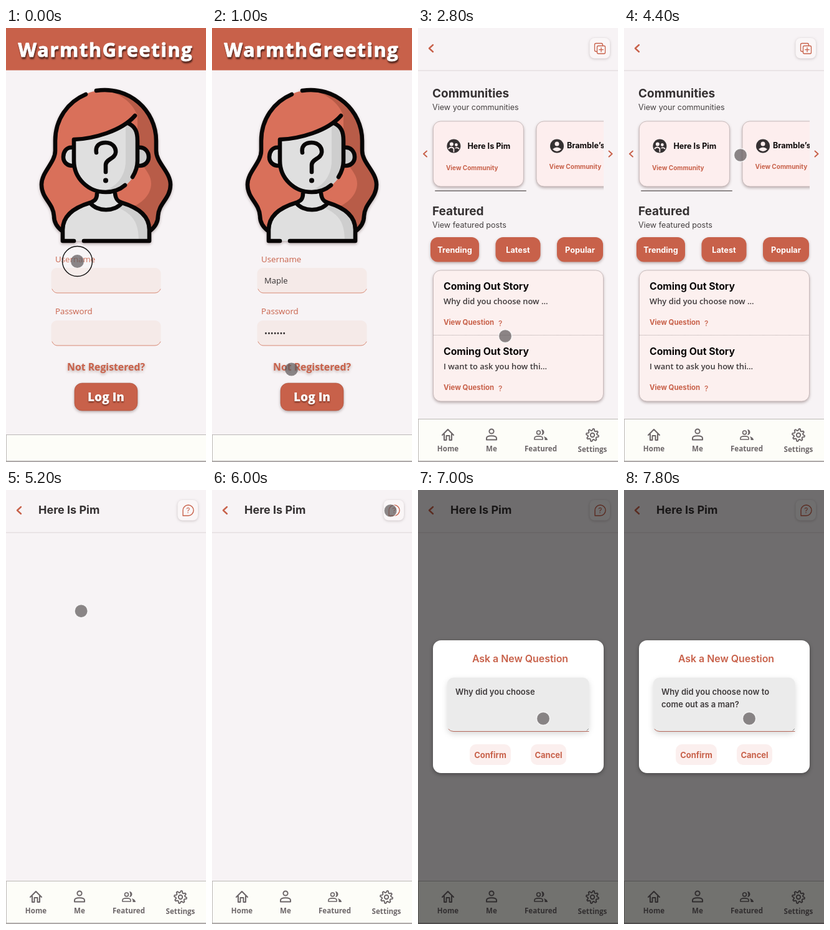
An HTML page that plays this animation: 321 by 693 pixels, repeating every 8 s.

```html
<!DOCTYPE html>
<html lang="en">
<head>
<meta charset="utf-8">
<title>Community app walkthrough</title>
<style>
  html, body { margin: 0; width: 100%; height: 100%; overflow: hidden; background: #f7f3f5; }
  svg { display: block; width: 321px; height: 693px; }
  text { font-family: Inter, sans-serif; font-weight: 700; white-space: pre; }
  .soft { font-family: "Open Sans", sans-serif; }
  .raised { filter: drop-shadow(0 2px 2px rgba(70, 40, 40, .35)); }
  .line { fill: none; stroke-linecap: round; stroke-linejoin: round; }
</style>
</head>
<body>
<svg id="stage" viewBox="0 0 321 693"></svg>
<script>
const RED = '#c8614a', BG = '#f7f3f5', INK = '#353132', GREY = '#6d6769';
const LOOP = 8000, STEP = 200;
const GROUP = 'Here Is Pim';
const QUESTION = ['Why did you choose now to ', 'come out as a man?'];

const text = (x, y, size, str, fill = INK, extra = '') =>
  `<text x="${x}" y="${y}" font-size="${size}" fill="${fill}" ${extra}>${str}</text>`;
const soft = (x, y, size, str, fill, weight, extra = '') =>
  text(x, y, size, str, fill, `class="soft" style="font-weight:${weight}" ${extra}`);
const box = (x, y, w, h, r, fill, extra = '') =>
  `<rect x="${x}" y="${y}" width="${w}" height="${h}" rx="${r}" fill="${fill}" ${extra}/>`;
const line = (d, color, width, extra = '') =>
  `<path class="line" d="${d}" stroke="${color}" stroke-width="${width}" ${extra}/>`;
const disc = (x, y, r, fill, extra = '') =>
  `<circle cx="${x}" cy="${y}" r="${r}" fill="${fill}" ${extra}/>`;
const area = (d, fill) => `<path d="${d}" fill="${fill}"/>`;
const group = (body, attrs = '') => `<g ${attrs}>${body}</g>`;
const centered = 'text-anchor="middle"';

function portrait() {
  const rightSide = 'M160 99C205 99 241 135 241 180V196C241 215 264 230 264 250C264 272 245 280 244 300' +
    'C244 312 238 322 228 326';
  const hair = rightSide + 'H92C82 322 77 312 77 300C76 280 57 272 57 250C57 230 79 215 79 196V180C79 135 115 99 160 99Z';
  const shade = rightSide + 'L190 290C215 284 233 268 233 248C233 228 211 220 211 190V140C203 118 182 104 158 99Z';
  const face = 'M109 178C140 177 180 165 198 152C207 157 211 165 211 180V212C211 240 188 262 160 262C132 262 109 240 109 212Z';
  const body = 'M91 340V322C91 300 108 288 135 279L146 272V255H175V268L186 279C215 288 230 300 230 322V340Z';
  const outlines = [
    'M128 106C99 118 79 146 79 180V196C79 215 57 230 57 250C57 272 76 280 77 300C77 310 82 318 90 324',
    'M145 100C198 92 241 132 241 180V196C241 215 264 230 264 250C264 272 245 280 244 300C244 310 239 318 231 324',
    'M207 140C185 165 140 177 109 178V212C109 240 132 262 160 262C173 262 184 257 191 251',
    'M196 152C207 157 211 165 211 180V212C211 222 208 230 203 238',
    'M108 191C96 189 92 199 92 206C92 214 98 220 107 220',
    'M212 191C223 189 229 198 229 206C229 214 223 220 214 220',
    'M146 264C146 274 142 276 135 279C108 287 91 300 91 322V340H109',
    'M175 264C176 273 179 277 186 279C213 287 230 300 230 322V340H125',
    'M135 279C146 294 175 294 186 279',
    'M145 199C143 187 151 183 160 183C171 183 177 191 176 199C175 209 160 209 160 219V230'
  ];
  return group(
    area(hair, '#d9705a') + area(shade, '#b85c48') +
    disc(105, 206, 14, '#dfdfdf') + disc(215, 206, 14, '#cecece') +
    area(body, '#dfdfdf') +
    area('M186 280C215 288 230 300 230 322V340H213C213 312 205 298 180 287Z', '#cecece') +
    area(face, '#dfdfdf') +
    area('M198 152C207 157 211 165 211 180V212C211 240 188 262 160 262L153 261C178 255 192 236 192 212V157Z', '#cecece') +
    line(outlines.join(''), '#080606', 6.6) + disc(160, 243.5, 4, '#080606'), 'class="raised"');
}

const field = (y, value) =>
  box(72.5, y, 176, 40, 9, '#f5eae8') +
  line(`M74 ${y + 34}Q77 ${y + 40} 82 ${y + 40}H239Q245 ${y + 40} 248 ${y + 34}`, '#d88873', 1) +
  soft(84, y + 25, 13, value, INK, 400);

function login(t) {
  const name = 'Maple'.slice(0, Math.max(0, t / 80));
  const dots = '•'.repeat(Math.min(7, Math.max(0, (t - 500) / 60)));
  return box(0, 0, 321, 67.5, 0, RED) +
    soft(160, 46, 30.5, 'WarmthGreeting', '#fff', 700, `${centered} letter-spacing="1.8" stroke="#fff" stroke-width="1"
      stroke-linejoin="round" filter="drop-shadow(1px 3px 1px rgba(50,20,15,.8))"`) +
    portrait() +
    soft(79, 374, 13.3, 'Username', RED, 500) + field(383, name) +
    soft(79, 457, 13.3, 'Password', RED, 500) + field(467, dots) +
    soft(160.5, 547, 15.8, 'Not Registered?', RED, 700, `${centered} filter="drop-shadow(0 2px 2px rgba(90,40,30,.4))"`) +
    box(110, 567, 101, 44, 12, RED, 'class="raised" stroke="#a9503c" stroke-width=".6"') +
    soft(160.5, 596, 19, 'Log In', '#fff', 800, `${centered} filter="drop-shadow(0 2px 1px rgba(70,20,10,.6))"`) +
    bottomBar(649.5);
}

const bottomBar = y =>
  box(.5, y, 322, 692 - y, 0, '#fdfdf8', 'stroke="#bcb8b7"') + box(0, 691.3, 321, 1.2, 0, '#8f8b8a');

function gear(cx, cy) {
  const points = [];
  for (let i = 0; i < 32; i++) {
    const a = (i + .5) * Math.PI / 16, r = i % 4 < 2 ? 10 : 7.3;
    points.push(`${(cx + r * Math.sin(a)).toFixed(1)} ${(cy - r * Math.cos(a)).toFixed(1)}`);
  }
  return line(`M${points.join('L')}Z`, GREY, 1.9) + disc(cx, cy, 3.2, 'none', `stroke="${GREY}" stroke-width="1.9"`);
}

const person = (x, y) =>
  line(`M${x - 8} ${y + 8.5}V${y + 6}C${x - 8} ${y + 1} ${x + 8} ${y + 1} ${x + 8} ${y + 6}V${y + 8.5}Z`, GREY, 2) +
  disc(x, y - 5, 3.6, 'none', `stroke="${GREY}" stroke-width="2"`);

function navBar() {
  const label = (x, str, y = 675.5) => soft(x, y, 11.6, str, GREY, 700, centered);
  return bottomBar(624.5) +
    line('M39 650L48 641L57 650M42 648V658H45.5V651H50.5V658H54V648', GREY, 2) +
    person(118, 649) +
    group(person(0, 0), 'transform="translate(193.5 650) scale(.82)"') +
    area('M198 641A4 4 0 1 1 198 650Q201 646 198 641ZM202 652Q208 654 208 658H203.5Q204 655 202 652Z', GREY) +
    gear(280, 650) +
    label(48, 'Home') + label(118, 'Me') + label(197, 'Featured') + label(280, 'Settings', 676.5);
}

function header(icon, title = '') {
  return box(0, 67, 321, 2, 0, '#e9e4e6') +
    line('M24 27L18 32.5L24 38', RED, 2.4) +
    text(52, 38, 18, title) +
    box(275.5, 16, 32.5, 32.5, 8, '#faf6f7', 'filter="drop-shadow(0 1px 2px rgba(70,50,50,.25))"') + icon;
}

const addIcon = box(287.5, 28.5, 13, 12.5, 2, 'none', `stroke="${RED}" stroke-width="1.3"`) +
  line('M287 37.5H286Q283.5 37.5 283.5 35.5V26.5Q283.5 24.500 286 24.500H294.5Q296.500 24.500 296.500 28M294 31.500V38M290.700 34.700H297.300', RED, 1.3);
const askIcon = line('M284 41V32.5A8.5 8.5 0 1 1 292.5 41Z', RED, 1.4) +
  text(292.2, 37, 12, '?', RED, `${centered} style="font-weight:400"`);

const cardStyle = 'class="raised" stroke="#bfb2b2" stroke-width=".8"';

function communityCard(x, name, many) {
  const cx = x + 33, cy = 188.5, pale = '#fdeeee';
  const glyph = many
    ? disc(cx - 3.5, cy - 3, 3, pale) + disc(cx + 4, cy - 2, 2.4, pale) +
      line(`M${cx - 8} ${cy + 4}Q${cx - 4} ${cy} ${cx} ${cy + 4}V${cy + 9}M${cx + 3} ${cy + 3}Q${cx + 6} ${cy + 2} ${cx + 8} ${cy + 4}`, pale, 1.8)
    : disc(cx, cy - 3.5, 3.5, pale) +
      area(`M${cx - 7} ${cy + 5}Q${cx} ${cy - 1} ${cx + 7} ${cy + 5}Q${cx} ${cy + 12} ${cx - 7} ${cy + 5}Z`, pale);
  return box(x, 149, 145, 104, 12, pale, cardStyle) +
    disc(cx, cy, 11, INK) + glyph +
    text(many ? x + 55 : x + 49, many ? 193 : 192, 12.6, name, '#0c0909') +
    text(x + 20.5, many ? 227 : 225, 10, 'View Community', RED);
}

const pill = (x, w, label) =>
  box(x, 334, w, 39.5, 12, RED, 'class="raised"') + text(x + w / 2, 358.5, 12.7, label, '#fff', centered);

const post = (y, summary) =>
  text(41, y, 15.8, 'Coming Out Story', '#0c0909') +
  soft(41, y + 23, 12.9, summary, '#3f3a3b', 600) +
  text(41, y + 56, 11.4, 'View Question', RED) +
  text(129, y + 58, 12, '?', RED, 'style="font-weight:500"');

const home = header(addIcon) +
  text(23, 111, 19, 'Communities') +
  text(23, 131, 12.6, 'View your communities', '#454041', 'style="font-weight:400"') +
  '<clipPath id="strip"><rect x="15" y="140" width="283" height="125"/></clipPath>' +
  group(communityCard(24.4, GROUP, true) + communityCard(190, 'Bramble\u2019s', false), 'clip-path="url(#strip)"') +
  line('M14 196.5L9 201L14 205.5M306.5 196.5L311.5 201L306.5 205.5', RED, 1.9) +
  line('M28 260H173', '#8f898a', 2) +
  text(23, 298.5, 19, 'Featured') +
  text(23, 319, 12.6, 'View featured posts', '#454041', 'style="font-weight:400"') +
  pill(20, 78, 'Trending') + pill(124.5, 72, 'Latest') + pill(223, 74, 'Popular') +
  box(24.5, 387, 273, 209, 12, '#fcf0ef', cardStyle) +
  line('M25 490.5H297', '#a39999', 1, 'stroke-dasharray=".1 2"') +
  post(418, 'Why did you choose now ...') + post(522, 'I want to ask you how thi...') +
  navBar();

const community = header(askIcon, GROUP) + navBar();

function dialog(t) {
  const typed = Math.round(Math.max(0, t - 6600) / 1000 * QUESTION.join('').length);
  const first = QUESTION[0].slice(0, typed);
  const second = QUESTION[1].slice(0, Math.max(0, typed - QUESTION[0].length));
  const entry = (y, str) => text(60, y, 13, str, '#3f3b3c', 'style="font-weight:600"');
  const action = (x, w, label) =>
    box(x, 406, w, 33, 10, '#fbefee') + text(x + w / 2, 427.5, 13, label, RED, centered);
  return box(0, 0, 321, 693, 0, '#000', 'opacity=".55"') +
    (t < 6400 ? box(275, 16, 34, 33, 0, '#63a8ba') : '') +
    box(24, 240, 274, 212, 13, '#fff', 'filter="drop-shadow(0 2px 3px rgba(0,0,0,.35))"') +
    text(164, 274.5, 15.9, 'Ask a New Question', RED, `${centered} style="font-weight:600"`) +
    box(47, 299.5, 227.5, 86, 10, '#ebebeb', 'filter="drop-shadow(0 4px 5px rgba(0,0,0,.15))"') +
    line('M49 382Q52 385.5 57 385.5H274', '#b5685a', 1) +
    line('M271 384L273.5 381.5', '#555', .7) +
    (typed ? entry(327, first) + entry(347, second) : entry(327, 'Write a question...')) +
    action(83, 66, 'Confirm') + action(181, 57, 'Cancel');
}

// Pointer stops: time, x, y
const STOPS = [
  [0, 114.5, 372.5], [400, 119, 403], [600, 120, 486], [800, 122, 490], [1200, 133, 600], [2000, 133, 600],
  [2800, 140, 492], [4400, 187, 203], [4800, 90, 223], [5000, 90, 223], [5800, 286, 33],
  [6200, 287, 33], [6600, 201, 365], [8000, 201, 365]
];
const RINGS = { 0: 24, 600: 24, 1200: 24, 4800: 24, 6200: 12, 6600: 24 };

function pointer(t) {
  const i = STOPS.findIndex(stop => stop[0] > t);
  const [t0, x0, y0] = STOPS[i - 1], [t1, x1, y1] = STOPS[i];
  const k = (t - t0) / (t1 - t0), ease = k * k * (3 - 2 * k);
  const x = x0 + (x1 - x0) * ease, y = y0 + (y1 - y0) * ease;
  const ring = RINGS[t], dark = t >= 6200;
  return (ring ? disc(x, y, ring, '#fff', `fill-opacity=".12" stroke="${dark ? '#eee' : '#111'}" stroke-width="1.4"`) : '') +
    disc(x, y, 10.5, '#5f5a5b', `fill-opacity=".72" stroke="#fff" stroke-opacity="${t < 1400 ? 0 : .75}" stroke-width="1.3"`);
}

function screen(t) {
  if (t < 1400) return login(t);
  if (t < 5000) return home;
  return community + (t >= 6200 ? dialog(t) : '');
}

const stage = document.getElementById('stage');
let shown = -1;
function draw() {
  const t = Math.floor(performance.now() % LOOP / STEP) * STEP;
  if (t !== shown) {
    stage.innerHTML = box(0, 0, 321, 693, 0, BG) + screen(t) + pointer(t);
    shown = t;
  }
  requestAnimationFrame(draw);
}
draw();
</script>
</body>
</html>
```
